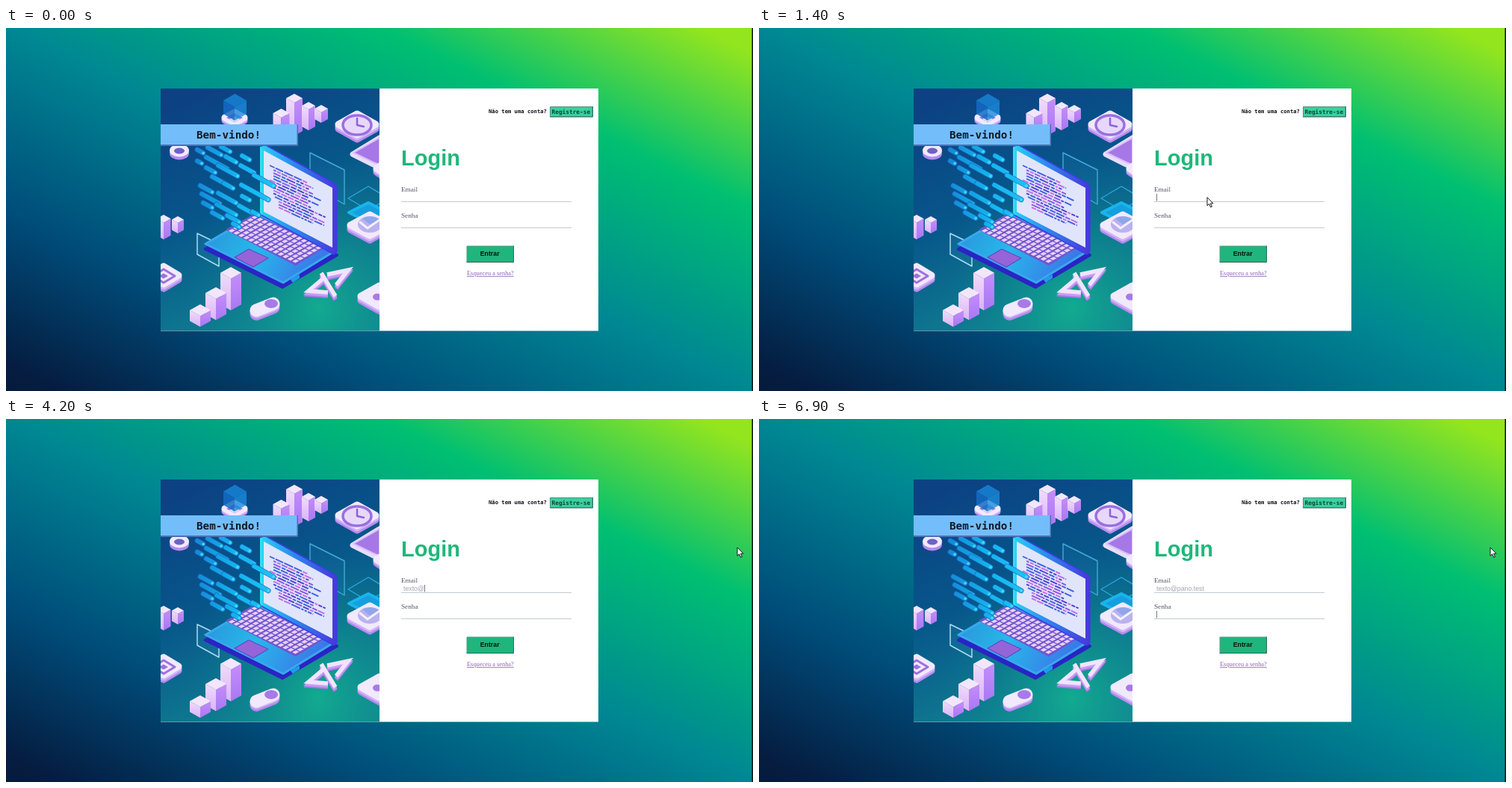
Animation of 1000 by 486 pixels, one loop 7.2 s. Source, as an HTML page:

```html
<!DOCTYPE html>
<html lang="pt">
<head>
<meta charset="utf-8">
<title>Login</title>
<style>
html, body { margin: 0; width: 100%; height: 100%; overflow: hidden; }
body { background: linear-gradient(to top right, #051b3b 0, #051d41 4%, #004d7a 25%, #008793 50%, #00bf72 75%, #93e51e 96.5%, #93e51e); }
svg { display: block; width: 1000px; height: 486px; }
.mono { font-family: "DejaVu Sans Mono", monospace; font-weight: bold; }
.sans { font-family: "Liberation Sans", Arial, sans-serif; }
.serif { font-family: "Liberation Serif", "Times New Roman", serif; }
</style>
</head>
<body>
<svg viewBox="0 0 1000 486" xmlns="http://www.w3.org/2000/svg">
  <defs>
    <clipPath id="photo"><path d="M207 81H500V405.5H207Z"/></clipPath>
    <linearGradient id="sky" x1=".2" y1="0" x2=".6" y2="1">
      <stop offset="0" stop-color="#0c4183"/><stop offset=".45" stop-color="#07568a"/><stop offset="1" stop-color="#128592"/>
    </linearGradient>
    <radialGradient id="glow" cx=".72" cy=".9" r=".6">
      <stop offset="0" stop-color="#12b28f" stop-opacity=".85"/><stop offset="1" stop-color="#0a7a90" stop-opacity="0"/>
    </radialGradient>
    <linearGradient id="barL" x1="0" y1="0" x2="0" y2="1">
      <stop offset="0" stop-color="#f1dcfb"/><stop offset="1" stop-color="#d9b3f6"/>
    </linearGradient>
    <linearGradient id="barR" x1="0" y1="0" x2="0" y2="1">
      <stop offset="0" stop-color="#c58dfb"/><stop offset="1" stop-color="#a878f2"/>
    </linearGradient>
    <linearGradient id="deck" x1="0" y1="0" x2="1" y2=".3">
      <stop offset="0" stop-color="#2a8fd8"/><stop offset=".5" stop-color="#27b8ea"/><stop offset="1" stop-color="#3a78e8"/>
    </linearGradient>
    <linearGradient id="lid" x1="0" y1="0" x2="1" y2="0">
      <stop offset="0" stop-color="#27d3f4"/><stop offset=".45" stop-color="#2d86ee"/><stop offset="1" stop-color="#4a35dc"/>
    </linearGradient>
    <linearGradient id="flow" gradientUnits="userSpaceOnUse" x1="252" y1="0" x2="365" y2="0">
      <stop offset="0" stop-color="#1487d6"/><stop offset=".5" stop-color="#13b5ec"/><stop offset="1" stop-color="#1fc3f5"/>
    </linearGradient>
  </defs>
  <path d="M207 81H793V405.5H207Z" fill="#fff"/>
  <g clip-path="url(#photo)">
    <path d="M207 81H500V405.5H207Z" fill="url(#sky)"/>
    <path d="M207 81H500V405.5H207Z" fill="url(#glow)"/>
    <g id="art"></g>
    <path d="M207 129H391V158H207Z" fill="#4c6fb5"/>
    <path d="M207 129H389.5V156H207Z" fill="#73bdfb"/>
  </g>
  <text class="mono" x="255" y="147.5" font-size="14.3" fill="#111a26">Bem-vindo!</text>

  <text class="mono" x="646" y="114.3" font-size="7.2" fill="#10101c">Não tem uma conta?</text>
  <path d="M728.5 105.5H785V118.5H728.5Z" fill="#38d29c" stroke="#4b8f84"/>
  <path d="M728 119H785.5V105" fill="none" stroke="#2b6d62"/>
  <text class="mono" x="730.5" y="114.5" font-size="7.8" fill="#0d4540">Registre-se</text>

  <text class="sans" x="529" y="184" font-size="29" font-weight="bold" fill="#1fb77a">Login</text>
  <g class="serif" font-size="9.2" fill="#555566">
    <text x="529" y="219">Email</text>
    <text x="529" y="254">Senha</text>
  </g>
  <path d="M529 232.5H757M529 267.5H757" stroke="#c3cad3"/>
  <path d="M617 292H679.5V313.5H617Z" fill="#1fb57c" stroke="#5c9c88"/>
  <path d="M616.5 313.5H679.5V291.5" fill="none" stroke="#246a58"/>
  <text class="sans" x="634.7" y="304.8" font-size="8.8" font-weight="bold" fill="#08150f">Entrar</text>
  <text class="serif" x="617" y="331.3" font-size="8.4" fill="#8a62b4" text-decoration="underline">Esqueceu a senha?</text>

  <text id="mail" class="sans" x="532" y="229.5" font-size="8.75" fill="#a3a3ae"></text>
  <path id="caret" d="M0 0V9.5" stroke="#77778a"/>
  <path d="M998.5 0H1000V486H998.5Z" fill="#04120f"/>
  <path id="mouse" d="M0 0V11.2L2.6 8.8L4.6 13.2L6.4 12.4L4.5 8.2H8Z" fill="#fff" stroke="#15151f" stroke-width="1"/>
</svg>
<script>
const $ = id => document.getElementById(id);
const art = $('art');

function add(tag, attrs) {
  const el = document.createElementNS('http://www.w3.org/2000/svg', tag);
  for (const k in attrs) el.setAttribute(k, attrs[k]);
  art.append(el);
}
const shape = (d, fill, stroke = 'none', width = 1, extra = {}) => add('path', {
  d, fill, stroke, 'stroke-width': width, 'stroke-linejoin': 'round', 'stroke-linecap': 'round', ...extra
});
const oval = (cx, cy, rx, ry, fill, stroke = 'none', width = 1) =>
  add('ellipse', { cx, cy, rx, ry, fill, stroke, 'stroke-width': width });
const diamond = (x, y, a, b) => `M${x - a} ${y}L${x} ${y - b}L${x + a} ${y}L${x} ${y + b}Z`;

// Isometric column: top apex at y, half width a, full height h
function bar(x, y, a, h) {
  const b = a * .55, low = y + h - b;
  shape(`M${x - a} ${y + b}V${low}L${x} ${y + h}V${y + 2 * b}Z`, 'url(#barL)');
  shape(`M${x + a} ${y + b}V${low}L${x} ${y + h}V${y + 2 * b}Z`, 'url(#barR)');
  shape(diamond(x, y + b, a, b), '#f3e6fb');
}
// Thick tile with rounded corners
function tile(x, y, a, b, depth, top = '#f1e9fc') {
  shape(diamond(x, y + depth, a, b), '#b58af0', '#b58af0', 9);
  shape(diamond(x, y + depth / 2, a, b), '#d2b2f8', '#d2b2f8', 9);
  shape(diamond(x, y, a, b), top, top, 9);
}
function seeded(s) {
  return () => (s = (s * 16807) % 2147483647) / 2147483647;
}

function scenery() {
  tile(306, 120, 13, 7, 4);
  shape(diamond(306, 120, 11, 6), '#8c7fe2');
  shape(diamond(306, 122, 7, 3.5), '#efe8ff');
  shape('M291 97L306 106V124L291 115Z', '#136bc4', 'none', 1, { opacity: .85 });
  shape('M322 97L306 106V124L322 115Z', '#1c8bdc', 'none', 1, { opacity: .8 });
  shape(diamond(306.5, 97, 15.5, 9), '#1679c8');

  bar(386, 88, 11, 56);
  bar(368.5, 108, 11, 38);
  bar(405, 99, 9, 38);
  bar(422, 103, 9, 24);

  tile(470, 129, 25, 14, 6);
  oval(470, 130, 19, 13, '#e7d8fa', '#9a6fe0', 3.5);
  shape('M470 121V130L479 132', 'none', '#8c62d8', 2.5);

  shape('M464 169L500 147V186L492 183Z', '#e9dcfb', '#e9dcfb', 7);
  shape('M465 167L500 147V183L492 180Z', '#a678e6', '#d9c2f8', 2);
  tile(506, 188, 10, 7, 5);

  oval(232, 168, 13, 8.5, '#b58af0');
  oval(232, 164, 13, 8.5, '#f1e9fc');
  oval(232, 164.5, 7, 4, '#6d62c4');

  shape('M407 167L453 190V236L407 210Z', '#1b78b030', '#43a9d6', 1.4);
  shape(diamond(485, 228, 27, 16), 'none', '#2aa6dd', 1.4);
  shape(diamond(485, 247, 26, 13), '#159fdf', '#18b5ec', 4);
  tile(487, 264, 26, 14, 6);
  oval(487, 263, 16, 11, '#b9b2ee');
  shape('M487 263L477 255Q488 249 500 256Z', '#8fa6ea');
  shape('M474 260L484 268L500 257', 'none', '#f4efff', 3);

  bar(211, 250, 9.5, 33);
  bar(230, 252, 8, 23);

  tile(211, 331, 20, 12, 6);
  shape(diamond(211, 332, 15, 9), 'none', '#9d72de', 3);
  shape(diamond(211, 332, 6, 3.5), '#9d72de');

  bar(301, 320, 14, 58);
  bar(281, 347, 14, 44);
  bar(260, 370, 14, 30);

  for (const [dy, c] of [[5, '#b58af0'], [2, '#d2b2f8'], [0, '#f1e9fc']])
    shape(`M335 ${378 + dy}L358 ${369 + dy}`, 'none', c, 17);
  oval(355, 369, 9, 6, '#a879e8');

  for (const [dy, c] of [[5, '#a879e8'], [3, '#c79cf6'], [0, '#f0e4fc']])
    add('path', {
      d: 'M425 335L405 352L431 354M422 328L441 359M430 330L458 324L442 344',
      transform: `translate(0 ${dy})`, fill: 'none', stroke: c, 'stroke-width': 5.5
    });

  tile(500, 359, 25, 14, 6);
  oval(497, 360, 6, 4.5, '#a879e8');
}

function laptop() {
  shape('M267 296L337 254L443 304L370 347Z', '#2a24c4', '#2a24c4', 4);
  shape('M267 289L337 248L441 298L371 341Z', 'url(#deck)', '#3aa8ee', 3);
  shape('M380 336L393 330V335L384 341Z', '#1f9be6');
  // keyboard
  shape('M296 270L333 250L425 294L388 317Z', '#6f56cf', '#6f56cf', 2);
  const rows = 6, cols = 14;
  for (let r = 0; r < rows; r++)
    for (let c = 0; c < cols; c++) {
      const u = (c + .5) / cols, v = (r + .5) / rows;
      const x = 333 + 92 * u - 37 * v, y = 250 + 44 * u + 21.5 * v;
      shape(`M${x - 4.6} ${y + .2}L${x + .5} ${y - 2.4}L${x + 4.6} ${y - .3}L${x - .5} ${y + 2.4}Z`, '#e9d0f7');
    }
  shape('M306 307L325 296L351 308L331 320Z', '#9564d8', '#5f4ac8', 1.2);
  // lid
  shape('M342 159Q343 155 348 157L438 207Q443 210 443 215V299L439 303L341 250Z', 'url(#lid)', '#3a3fe0', 1.5);
  shape('M341.5 160V249', 'none', '#2fe0f2', 3);
  shape('M345 164L437 214V294L345 246Z', '#e0e5fc');
  // code
  const rnd = seeded(41), inks = ['#4b3fd0', '#8a55e0', '#c26ae6', '#3d5fe0'];
  for (let r = 0; r < 14; r++) {
    let x = 353 + (r % 5 > 0 ? 5 : 0) + (r > 9 ? 7 : 0);
    const end = 404 + rnd() * 24, top = 184 + r * 3.9;
    while (x < end) {
      const len = Math.min(3 + rnd() * 9, end - x), y = top + (x - 353) * .46;
      shape(`M${x} ${y}l${len} ${len * .46}`, 'none', inks[rnd() * 4 | 0], 1.9, { 'stroke-linecap': 'butt' });
      x += len + 1.3;
    }
  }
}

function stream() {
  // x, y, run of each capsule
  const runs = [
    [256, 163, 8], [270, 160, 18], [288, 159, 12], [256, 178, 6], [268, 173, 28],
    [294, 172, 14], [316, 171, 10], [268, 187, 12], [284, 184, 26], [314, 184, 18],
    [332, 197, 26], [276, 199, 20], [260, 211, 16], [292, 208, 12], [315, 210, 36],
    [262, 222, 24], [284, 221, 24], [316, 225, 10], [264, 234, 12], [282, 236, 26],
    [312, 238, 18], [276, 247, 14], [296, 251, 16], [304, 262, 8], [330, 246, 8]
  ];
  for (const [x, y, n] of runs) {
    const d = `M${x} ${y}l${n} ${n * .55}`;
    shape(d, 'none', '#1a62c0', 7);
    shape(d, 'none', 'url(#flow)', 5.6);
    shape(`M${x + n} ${y + n * .55}h.1`, 'none', '#46d8fa', 3.5);
  }
}

scenery();
shape('M256 275L285 289V319L256 303Z', '#2b8cc030', '#a9dcf2', 1.5);
laptop();
stream();

const LOOP = 7200, FOCUS = 1400, TAB = 6700;
const ADDRESS = 'texto@pano.test';
const KEYS = [2600, 2800, 3000, 3200, 3400, 4100, 4600, 4800, 5000, 5100, 5200, 5400, 5900, 6100, 6400];
// time, x, y of the pointer
const PATH = [[100, 720, 490], [500, 650, 350], [800, 608, 284], [900, 607, 278],
  [1200, 600, 228], [1500, 600, 226], [1800, 880, 190], [2000, 979, 172]];
const mail = $('mail'), caret = $('caret'), mouse = $('mouse');

function pointer(t) {
  let i = 0;
  while (i < PATH.length - 2 && t >= PATH[i + 1][0]) i++;
  const [t0, x0, y0] = PATH[i], [t1, x1, y1] = PATH[i + 1];
  const k = Math.min(1, (t - t0) / (t1 - t0));
  return [x0 + (x1 - x0) * k, y0 + (y1 - y0) * k];
}

function draw(now) {
  const t = Math.floor(now % LOOP / 100) * 100;
  const typed = KEYS.filter(k => k <= t);
  mail.textContent = ADDRESS.slice(0, typed.length);

  const tabbed = t >= TAB;
  const last = tabbed ? TAB : typed.length ? typed[typed.length - 1] : FOCUS;
  const lit = t >= FOCUS && (t - last) % 1000 < 500;
  const x = tabbed ? 532.5 : 532.5 + (typed.length ? mail.getComputedTextLength() : 0);
  caret.setAttribute('transform', `translate(${Math.floor(x) + .5} ${tabbed ? 257 : 222})`);
  caret.style.visibility = lit ? 'visible' : 'hidden';

  mouse.style.visibility = t >= PATH[0][0] ? 'visible' : 'hidden';
  mouse.setAttribute('transform', `translate(${pointer(t)})`);
  requestAnimationFrame(() => draw(performance.now()));
}
draw(performance.now());
</script>
</body>
</html>
```
